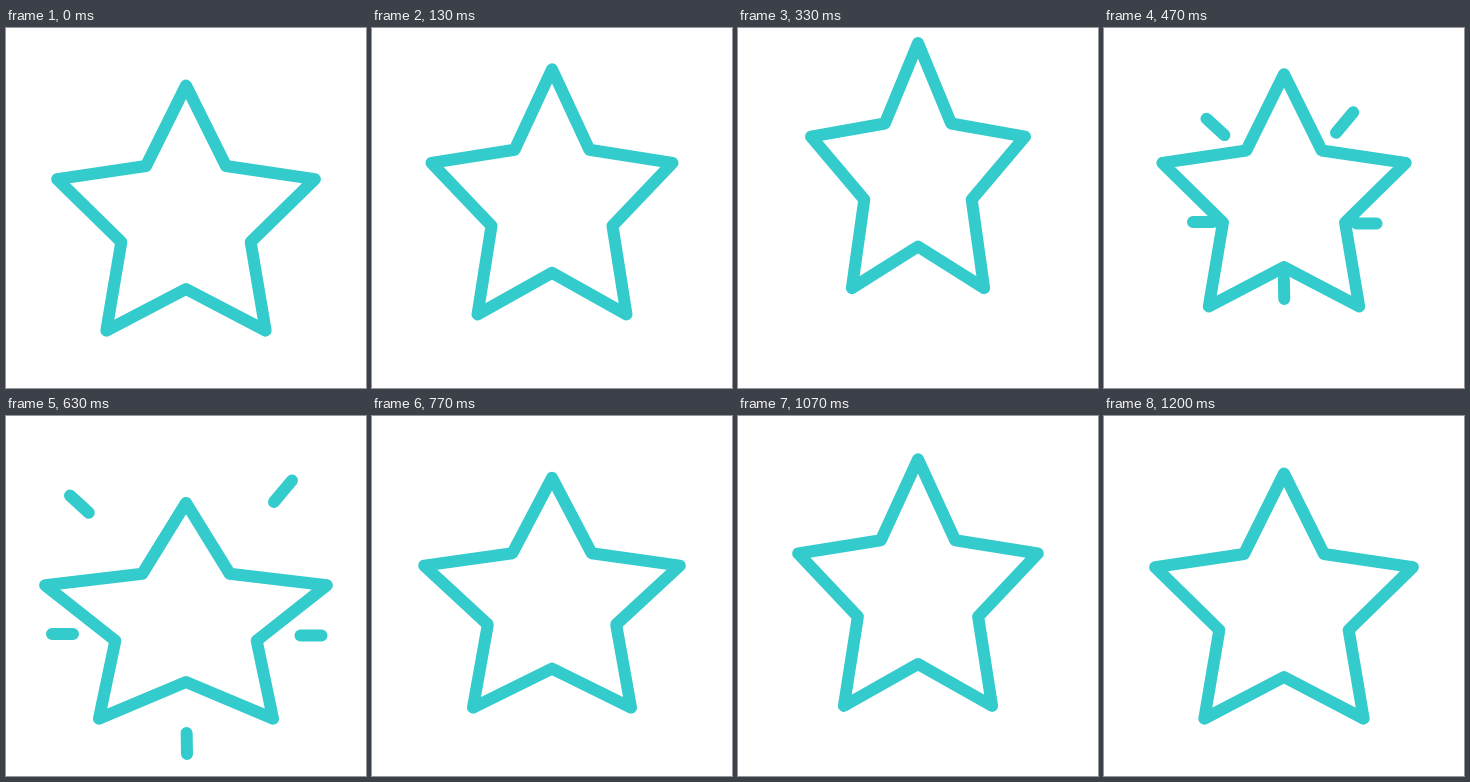
These frames come from a looping animation (360x360 px, 1.57 s). An HTML page:

```html
<!DOCTYPE html>
<html lang="en">
<head>
<meta charset="utf-8">
<title>Bouncing star</title>
<style>
  html, body { margin: 0; width: 100%; height: 100%; overflow: hidden; background: #fff; }
  svg { display: block; width: 100vw; height: 100vh; }
  path { fill: none; stroke: #34cbcd; stroke-width: 12; stroke-linecap: round; stroke-linejoin: round; }
</style>
</head>
<body>
<svg viewBox="0 0 360 360">
  <path id="rays"/>
  <path id="star"/>
</svg>
<script>
const LOOP = 1570;
const LAST = 36;
const CX = 180, CY = 193;
const OUTER = 135.5, INNER = 68;
const FOOT = OUTER * Math.cos(Math.PI / 5);

// Two hops with a squash between them
const rest = { sx: 1, sy: 1, lift: 0 };
const poses = [
  { at: 0, ...rest },
  { at: 10, sx: 0.83, sy: 1, lift: 42.5 },
  { at: 19, sx: 1.093, sy: 0.88, lift: 0 },
  { at: 28, sx: 0.86, sy: 1.012, lift: 25.5 },
  { at: LAST, ...rest }
];

// Rays by outer end, heading in degrees and visible length
const rays = [
  { x: 286, y: 64.5, turn: -50, size: 28 },
  { x: 64, y: 79.5, turn: -137.5, size: 25.5 },
  { x: 315.5, y: 219.5, turn: 0, size: 21 },
  { x: 46, y: 218, turn: 180, size: 21 },
  { x: 181, y: 338, turn: 89, size: 21 }
];
const REACH = 3.8;

const star = document.getElementById("star");
const burst = document.getElementById("rays");

const clamp = v => Math.min(1, Math.max(0, v));
const mix = (a, b, p) => a + (b - a) * p;
const ease = p => p - 0.2 * Math.sin(2 * Math.PI * p) / (2 * Math.PI);
const point = (x, y) => x.toFixed(2) + " " + y.toFixed(2);

function poseAt(step) {
  const next = Math.max(1, poses.findIndex(p => p.at >= step));
  const a = poses[next - 1], b = poses[next];
  const p = ease((step - a.at) / (b.at - a.at));
  return { sx: mix(a.sx, b.sx, p), sy: mix(a.sy, b.sy, p), lift: mix(a.lift, b.lift, p) };
}

// The star stretches from its feet
function starPath({ sx, sy, lift }) {
  const corners = Array.from({ length: 10 }, (_, i) => {
    const r = i % 2 ? INNER : OUTER, a = i * Math.PI / 5;
    return point(CX + sx * r * Math.sin(a), CY + FOOT - lift - sy * (FOOT + r * Math.cos(a)));
  });
  return "M" + corners.join("L") + "Z";
}

// Head and tail of each ray run outwards while the ray rides with the star
function raysPath(step, lift) {
  const head = REACH * (1 - clamp((step - 11) / 6.5));
  const tail = REACH * (1 - clamp((step - 12) / 9.5));
  if (head >= tail) return "";
  return rays.map(({ x, y, turn, size }) => {
    const a = turn * Math.PI / 180;
    const back = d => point(x - d * size * Math.cos(a), y - lift - d * size * Math.sin(a));
    return "M" + back(tail) + "L" + back(head);
  }).join("");
}

// Thirty steps a second, with changes on whole hundredths
function stepAt(ms) {
  return Math.min(LAST, Math.floor((Math.floor(ms / 10) * 10 + 3.4) * 0.03));
}

const start = performance.now();
function tick() {
  const step = stepAt((performance.now() - start) % LOOP);
  const pose = poseAt(step);
  star.setAttribute("d", starPath(pose));
  burst.setAttribute("d", raysPath(step, pose.lift));
  requestAnimationFrame(tick);
}
tick();
</script>
</body>
</html>
```
